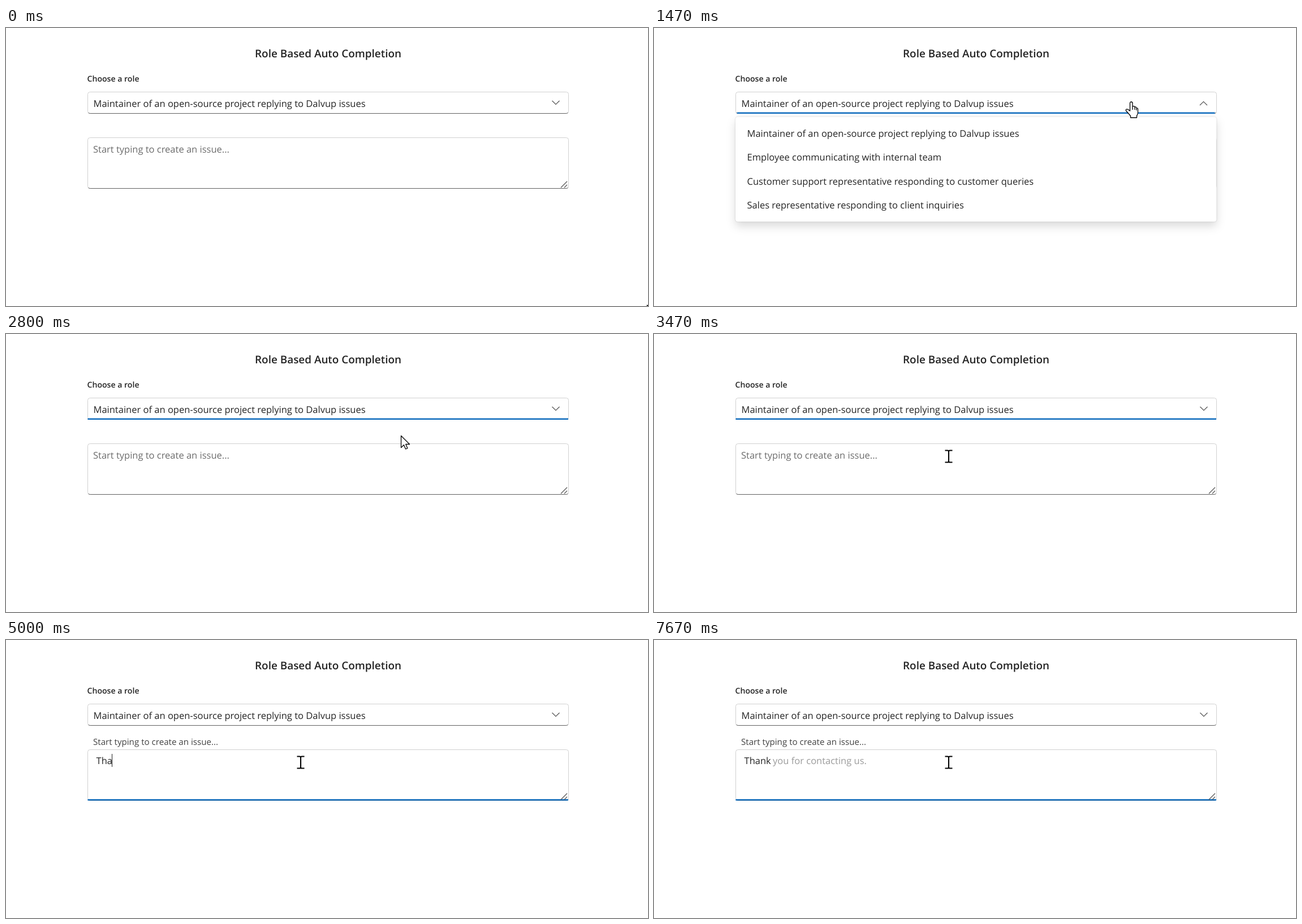
An HTML page for the animation above (8000 ms loop, 1135x493 px).

```html
<!DOCTYPE html>
<html lang="en">
<head>
<meta charset="utf-8">
<title>Role Based Auto Completion</title>
<style>
html, body { margin: 0; height: 100%; overflow: hidden; background: #fff; }
svg { display: block; width: 1135px; height: 493px; }
text { font: 16.5px "Open Sans", "Noto Sans", sans-serif; fill: #242424; text-rendering: geometricPrecision; white-space: pre; }
.bold { font-weight: 600; }
.box { fill: #fff; stroke: #d1d1d1; }
.base { fill: none; stroke: #616161; }
.thin { fill: none; stroke: #555; stroke-width: 1.2; }
.focus { fill: #0f6cbd; }
#popup > rect:first-child { filter: drop-shadow(0 0 1.2px rgba(0,0,0,.2)) drop-shadow(0 8px 8px rgba(0,0,0,.14)); }
.cursor { fill: #fff; stroke: #000; stroke-width: 1.3; stroke-linejoin: round; }
</style>
</head>
<body>
<svg viewBox="0 0 1135 493">
  <text class="bold" x="569.5" y="51.5" text-anchor="middle" style="font-size:18.9px">Role Based Auto Completion</text>
  <text class="bold" x="143.5" y="95" style="font-size:14.1px">Choose a role</text>

  <rect class="box" x="144.5" y="113.5" width="850" height="38" rx="4"/>
  <path class="base" d="M145.5 150Q146.5 151.5 148.5 151.5H990.5Q992.5 151.5 993.5 150"/>
  <text class="role" x="154.5" y="140"></text>
  <path id="chevron" class="thin"/>
  <rect id="roleLine" class="focus" y="149.6" height="2.5" rx="1"/>

  <rect class="box" x="144.5" y="194.5" width="850" height="90" rx="4"/>
  <path class="base" d="M145.5 283Q146.5 284.5 148.5 284.5H990.5Q992.5 284.5 993.5 283"/>
  <rect id="areaLine" class="focus" y="282.2" height="2.5" rx="1"/>
  <path class="thin" d="M981 283L992 272M987 283L992 278"/>
  <text id="label" x="154">Start typing to create an issue...</text>
  <text id="typed" x="159.5" y="220.3"></text>
  <text id="ghost" x="210" y="220.3" style="fill:#9b9b9b">you for contacting us.</text>
  <rect id="caret" y="202" width="1" height="23" fill="#222"/>

  <g id="popup">
    <rect x="144" y="157.5" width="850.5" height="186" rx="4.5" fill="#fff"/>
    <rect id="hover" x="149" y="166" width="840" height="39.5" rx="4" fill="#f5f5f5"/>
    <text class="role" x="164.5" y="193"></text>
    <text x="164.5" y="235.3">Employee communicating with internal team</text>
    <text x="164.5" y="277.7">Customer support representative responding to customer queries</text>
    <text x="164.5" y="320">Sales representative responding to client inquiries</text>
  </g>

  <path id="arrow" class="cursor" d="M.5 .5V21.5L5.4 16.8 8.5 24 11.8 22.6 8.7 15.5H15.5Z"/>
  <path id="hand" class="cursor" d="M-1.5 16V2.5Q-1.5 0 .7 0T3 2.5V9Q3 7.7 5 7.7T7 10Q7.2 8.7 8.6 8.9T10 11.2Q12.5 10.5 12.5 13V19Q12.5 22 10.5 24.5V28H-.5V25Q-4 20.5-8.3 16Q-9.4 14-7.7 13Q-6 12.5-1.5 16ZM3 9V14M7 10V14M10 11V15"/>
  <g id="beam" fill="none">
    <path d="M-6.5-10.5H-2Q0-10.5 0-9Q0-10.5 2-10.5H6.5M0-9V9M-6.5 10.5H-2Q0 10.5 0 9Q0 10.5 2 10.5H6.5" stroke="#fff" stroke-width="4"/>
    <path d="M-6.5-10.5H-2Q0-10.5 0-9Q0-10.5 2-10.5H6.5M0-9V9M-6.5 10.5H-2Q0 10.5 0 9Q0 10.5 2 10.5H6.5" stroke="#000" stroke-width="2.1"/>
  </g>
</svg>
<script>
const LOOP = 8000, STEP = 1000 / 15;
const OPEN = 21, CLOSE = 42, FOCUS_ROLE = 19, FOCUS_AREA = 55;
const KEYS = [68, 73, 75, 77, 81];              // steps at which "Thank" gains a letter
const CARET_X = [159, 168, 178, 187, 196, 206];
const BLINKS = [55, 63, 68, 88, 96, 104, 108, 115]; // caret on, off, on, ...

const $ = id => document.getElementById(id);
const set = (id, attrs) => { for (const k in attrs) $(id).setAttribute(k, attrs[k]); };
const show = (id, on) => set(id, { visibility: on ? "visible" : "hidden" });
const mix = (a, b, p) => a + (b - a) * p;
const clamp = p => Math.min(1, Math.max(0, p));
const smooth = p => p * p * (3 - 2 * p);
const passed = (list, n) => list.filter(s => n >= s).length;

// sharp ease-out used by the focus lines and the floating label
const grow = k => k < 0 ? 0 : k >= 4 ? 1 : 1 - 0.18 ** (k + 0.01);

for (const el of document.querySelectorAll(".role"))
  el.textContent = "Maintainer of an open-source project replying to Dalvup issues";

function bezier(a, b, c, d, p) {
  const q = 1 - p;
  return q * q * q * a + 3 * q * q * p * b + 3 * q * p * p * c + p * p * p * d;
}

function pointer(n) {
  if (n < 28) {
    const p = smooth(clamp((n - 1) / 12));
    return [bezier(1133, 1060, 860, 843, p), bezier(491, 250, -20, 131, p)];
  }
  if (n < CLOSE) {
    const p = smooth(clamp((n - 28) / 7));
    return [mix(843, 698, p), mix(131, 179.5, p)];
  }
  const p = smooth(clamp((n - CLOSE) / 10));
  return [mix(698, 521, p), mix(179.5, 216.5, p)];
}

function focusLine(id, part) {
  const w = 850 * part;
  set(id, { x: 569.2 - w / 2, width: w });
}

function draw(t) {
  const n = Math.floor((t + 4) / STEP);
  const open = n >= OPEN && n < CLOSE;
  const lift = grow(n - FOCUS_AREA);
  const letters = passed(KEYS, n);
  const [x, y] = pointer(n);

  set("chevron", { d: open ? "M965 137L971.5 130.5 978 137" : "M965.5 129L972 135.5 978.5 129" });
  focusLine("roleLine", grow(n - FOCUS_ROLE) - lift);
  focusLine("areaLine", lift);

  const grey = Math.round(mix(108, 66, lift));
  set("label", {
    y: mix(221, 186, lift),
    style: `font-size:${mix(16.5, 15.15, lift)}px;fill:rgb(${grey},${grey},${grey})`
  });
  $("typed").textContent = "Thank".slice(0, letters);
  show("ghost", n >= 108);
  set("caret", { x: CARET_X[letters] });
  show("caret", passed(BLINKS, n) % 2);

  const onRole = x < 994 && y > 113 && y < 152;
  const onOption = open && y >= 166;
  const onArea = !open && x < 994 && y > 194 && y < 285;
  show("popup", open);
  show("hover", onOption);

  const kind = onRole || onOption ? "hand" : onArea ? "beam" : "arrow";
  for (const id of ["arrow", "hand", "beam"]) show(id, id === kind);
  set(kind, { transform: `translate(${Math.round(x)} ${Math.round(y)})` });
}

const start = performance.now();
function tick() {
  draw((performance.now() - start) % LOOP);
  requestAnimationFrame(tick);
}
tick();
</script>
</body>
</html>
```
